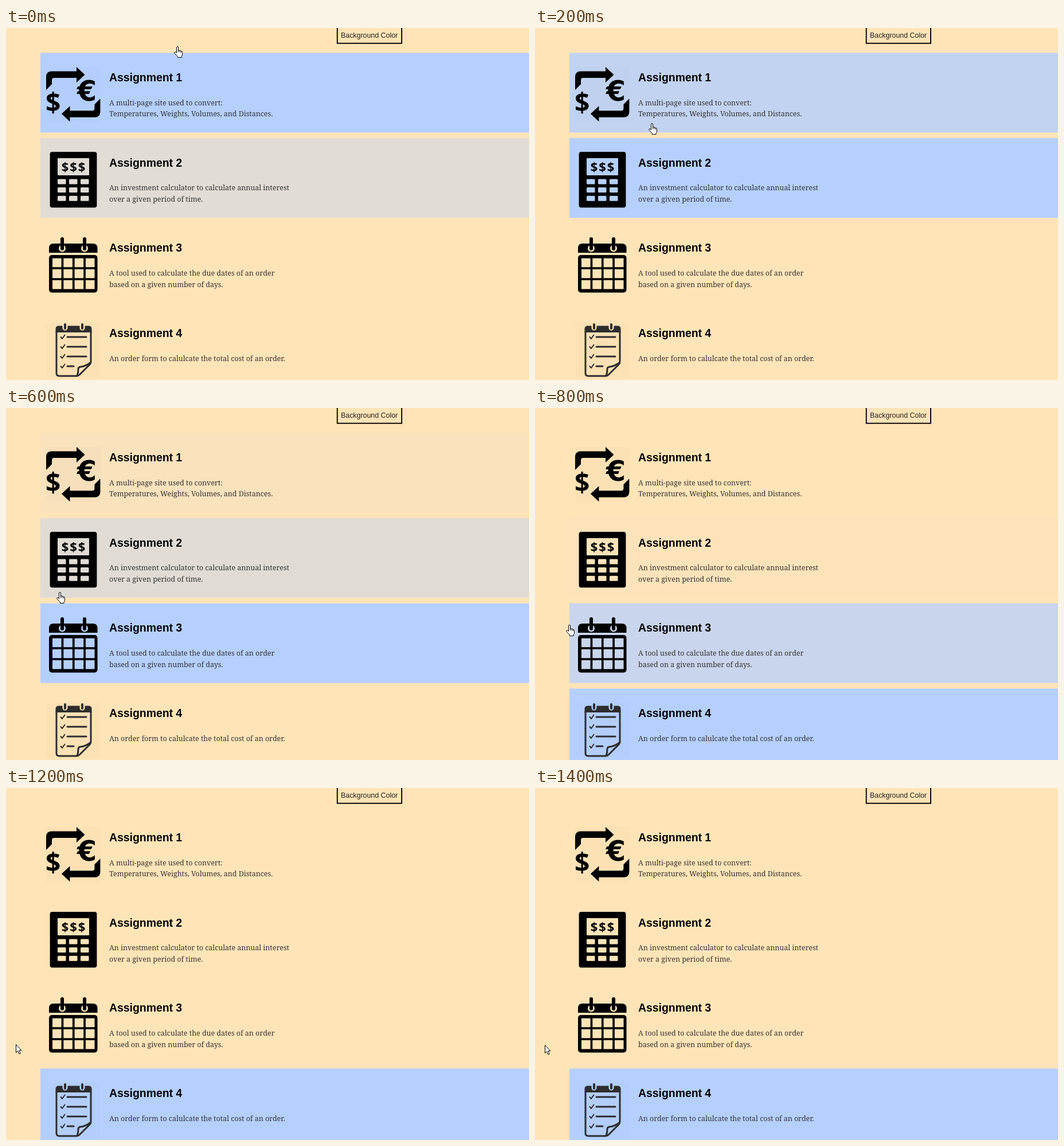
Recreate the animation shown at these times as an HTML page. Size 912x614 px, loop 1.6 s.

```html
<!DOCTYPE html>
<html lang="en">
<head>
<meta charset="utf-8">
<title>Assignments</title>
<style>
  html, body { margin: 0; width: 100%; height: 100%; overflow: hidden; background: #ffe4b7; }
  svg { display: block; }
  .hole { fill: var(--bg); }
  .tint { fill: #000; opacity: .012; }
  text { font-family: "Liberation Sans", Arial, sans-serif; }
  .title { font-size: 19.4px; font-weight: bold; }
  .body { font-family: "Noto Serif", Georgia, serif; font-size: 12.45px; fill: #333; }
  .dollar { font-family: "Open Sans", sans-serif; font-weight: bold; }
  .euro { font-family: "DejaVu Sans", sans-serif; font-weight: bold; }
  .line { fill: none; stroke: #2d2d2d; stroke-width: 3; stroke-linecap: round; stroke-linejoin: round; }
  .check { stroke-width: 2; }
  .cursor { fill: #fff; stroke: #000; stroke-linejoin: round; }
</style>
</head>
<body>
<svg id="stage" width="912" height="614" viewBox="0 0 912 614">
  <rect width="912" height="614" fill="#ffe4b7"/>
  <rect x="577.7" y="-10" width="112.3" height="36.7" fill="none" stroke="#000" stroke-width="1.9"/>
  <text x="584" y="17" font-size="12.4" fill="#222">Background Color</text>
  <g id="rows"></g>
  <g id="hand" class="cursor">
    <path d="M4.5 1.8Q4.5.5 6 .5T7.5 2V7Q9.2 6 10 7.5Q11.6 6.8 12.3 8.3Q14.5 8 14.5 10.5V14Q14.3 16 13 17.5V19.5H6.5V18Q4 15 1.2 12.3Q.2 10.5 1.5 9.8Q3 9.5 4.5 11.5Z"/>
    <path d="M7.5 6.5V10M10 7.5V10.5M12.4 8.5V11" fill="none"/>
  </g>
  <path id="arrow" class="cursor" d="M.5.5V14.5L3.6 11.5L6 17L8.2 16L5.8 10.8H10Z"/>
</svg>
<script>
const LOOP = 1600, STEP = 200, FADE = 533;
const BASE = [255, 228, 183], HOVER = [181, 208, 255];
const TOP = 43.4, PITCH = 148.67;
const byId = id => document.getElementById(id);

const rect = (x, y, w, h, rx = 0, cls = "") =>
  `<rect x="${x}" y="${y}" width="${w}" height="${h}" rx="${rx}" class="${cls}"/>`;

// Evenly spaced openings that show the row colour
function grid(cols, rows, x, y, dx, dy, w, h, rx) {
  let out = "";
  for (let j = 0; j < rows; j++)
    for (let i = 0; i < cols; i++) out += rect(x + i * dx, y + j * dy, w, h, rx, "hole");
  return out;
}

function exchangeIcon() {
  const bend = "M70 108V85Q70 75.500 80 75.500H123V68L137.500 81.500L123 95V87H84Q80 87 80 91V98Z".replaceAll(".500", ".5");
  return rect(70, 68, 95, 96, 0, "tint") +
    `<path d="${bend}"/><path d="${bend}" transform="rotate(180 117.2 115.6)"/>
    <text class="euro" x="124" y="126.5" font-size="49">€</text>
    <text class="dollar" x="69" y="147" font-size="46">$</text>`;
}

function calculatorIcon() {
  const signs = [103, 117.5, 132].map(x =>
    `<text class="dollar" x="${x}" y="249.5" font-size="22" text-anchor="middle">$</text>`).join("");
  return rect(76.6, 216, 81.8, 97.2, 4) + rect(90, 227, 55, 30, 1, "hole") + signs +
    grid(3, 3, 90, 263.5, 20, 14.6, 14.5, 9, 1.5);
}

function calendarIcon() {
  const rings = [98, 137].map(x =>
    `<circle class="hole" cx="${x}" cy="384.5" r="6"/>` + rect(x - 3, 365, 6, 23, 3)).join("");
  return '<path d="M75 392V384Q75 376 83 376H151.5Q159.5 376 159.5 384V392Z"/>' + rings +
    rect(75, 396, 84.5, 65.5, 5) + grid(4, 3, 81, 401.7, 19.3, 19.1, 15.6, 15.5, 0);
}

function checklistIcon() {
  const rings = [103, 133].map(x =>
    rect(x - 4.5, 514, 9, 13.5, 4.5, "hole") + rect(x - 2, 515, 4, 11, 2)).join("");
  const items = [539, 556, 573, 590].map((y, i) =>
    `<path class="line" d="M107 ${y}H${i < 3 ? 140 : 118}"/>
    <path class="line check" d="M95.5 ${y}l2.5 3l4.5 -6.5"/>`).join("");
  return rect(70, 514, 94, 96, 0, "tint") +
    `<g fill="#2d2d2d"><path d="M86.5 531V525Q86.5 519.5 92 519.5H144Q149.5 519.5 149.5 525V531Z"/>${rings}</g>
    <path class="line" d="M88 530V602Q88 607 93 607H123Q126 607 128 605L146 587Q148 585 148 582V530"/>
    <path class="line" d="M124 606.5Q126 602 126 595Q126 591.5 130 591Q139 590 147.5 583.5"/>` + items;
}

// Each row lights up at "on" and begins to fade at "off"
const rows = [
  { icon: exchangeIcon, on: 0, off: 107,
    lines: ["A multi-page site used to convert:", "Temperatures, Weights, Volumes, and Distances."] },
  { icon: calculatorIcon, on: 200, off: 288, start: .41,
    lines: ["An investment calculator to calculate annual interest", "over a given period of time."] },
  { icon: calendarIcon, on: 400, off: 656,
    lines: ["A tool used to calculate the due dates of an order", "based on a given number of days."] },
  { icon: checklistIcon, on: 800, off: LOOP,
    lines: ["An order form to calulcate the total cost of an order."] }
];

const label = (cls, y, s) => `<text class="${cls}" x="180" y="${Math.round(y)}">${s}</text>`;

byId("rows").innerHTML = rows.map((r, i) => {
  const y = TOP + i * PITCH;
  return `<g>${rect(60, y, 852, 139, 0, "hole")}${r.icon()}` +
    label("title", y + 49.7, `Assignment ${i + 1}`) +
    r.lines.map((s, k) => label("body", y + 91.2 + k * 19.7, s)).join("") + "</g>";
}).join("");
const groups = [...byId("rows").children];

const path = [[293, 32], [198, 166], [127, 260], [88, 321], [54, 378], [22, 423], [17, 447], [17, 448]];

function level(r, t) {
  if (t < r.on) return r.start || 0;
  return Math.max(0, Math.min(1, 1 - (t - r.off) / FADE));
}

function draw(now) {
  const step = Math.floor(now % LOOP / STEP), t = step * STEP;
  rows.forEach((r, i) => {
    const k = level(r, t);
    const mix = BASE.map((c, n) => Math.round(c + (HOVER[n] - c) * k));
    groups[i].style.setProperty("--bg", `rgb(${mix})`);
  });
  const pointing = step < 6;
  byId("hand").style.display = pointing ? "" : "none";
  byId("arrow").style.display = pointing ? "none" : "";
  byId(pointing ? "hand" : "arrow").setAttribute("transform", `translate(${path[step]})`);
}

const begin = performance.now();
function tick() {
  draw(performance.now() - begin);
  requestAnimationFrame(tick);
}
tick();
</script>
</body>
</html>
```
